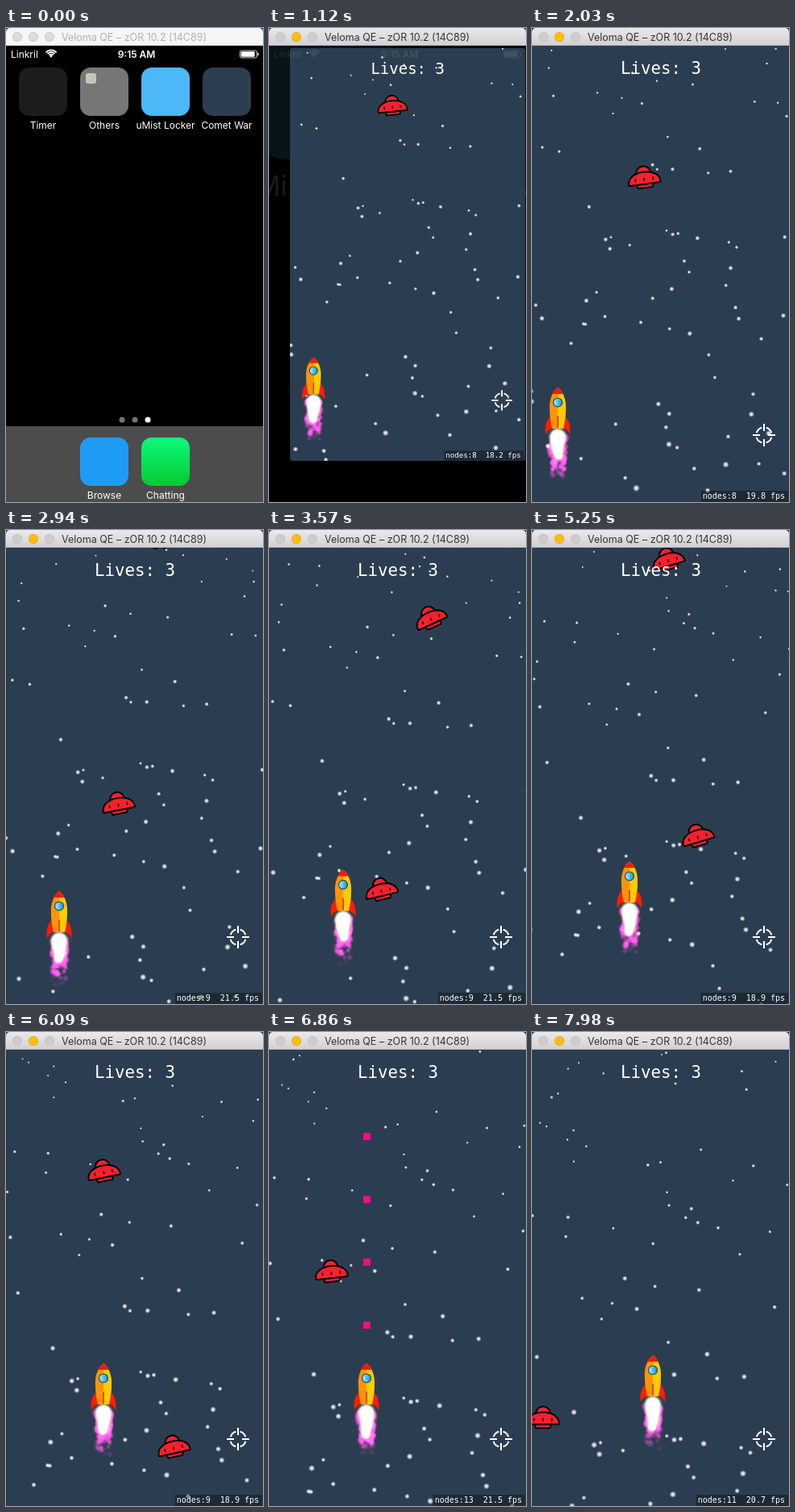
An HTML page with a canvas for the animation above (8000 ms loop, 319x588 px).

```html
<!DOCTYPE html>
<html lang="en">
<head>
<meta charset="utf-8">
<title>Rocket game in a simulator</title>
<style>
  html, body { margin: 0; width: 100%; height: 100%; overflow: hidden; background: #000; }
  canvas { display: block; width: 319px; height: 588px; }
</style>
</head>
<body>
<canvas id="stage" width="319" height="588"></canvas>
<script>
const ctx = document.getElementById('stage').getContext('2d');
const W = 319, H = 588, BAR = 22, LOOP = 8000, STEP = 70;
const SANS = 'Inter, sans-serif';
const MONO = '"DejaVu Sans Mono", monospace';

// Ticks on which the screen stood still, and the tick that stays visible.
const HELD = { 770: 700, 840: 700, 3990: 3920, 7700: 7630 };

const clamp = v => Math.max(0, Math.min(1, v));
const smooth = v => v * v * (3 - 2 * v);

function seeded(seed) {
  return () => {
    seed = (seed * 1664525 + 1013904223) >>> 0;
    return seed / 4294967296;
  };
}

function at(x, y, draw) {
  ctx.save();
  ctx.translate(x, y);
  draw();
  ctx.restore();
}

function disc(x, y, r, fill) {
  ctx.fillStyle = fill;
  ctx.beginPath();
  ctx.arc(x, y, r, 0, 7);
  ctx.fill();
}

function box(x, y, w, h, r, fill) {
  ctx.fillStyle = fill;
  ctx.beginPath();
  ctx.roundRect(x, y, w, h, r);
  ctx.fill();
}

function label(text, x, y, font, fill, align = 'center') {
  ctx.font = font;
  ctx.fillStyle = fill;
  ctx.textAlign = align;
  ctx.fillText(text, x, y);
}

function gradient(x0, y0, x1, y1, ...colors) {
  const g = ctx.createLinearGradient(x0, y0, x1, y1);
  colors.forEach((c, i) => g.addColorStop(i / (colors.length - 1), c));
  return g;
}

function glow(x, y, r, rgb, alpha, core = 0) {
  const g = ctx.createRadialGradient(x, y, 0, x, y, r);
  g.addColorStop(core, `rgba(${rgb},${alpha})`);
  g.addColorStop(1, `rgba(${rgb},0)`);
  disc(x, y, r, g);
}

// ---- Home screen ----
function icon(column, y, name, fill) {
  const x = 16 + 76 * column;
  box(x, y, 60, 60, 13, fill);
  label(name, x + 30, y + 76, `12px ${SANS}`, '#fff');
}

function drawHome() {
  icon(0, 49, 'Timer', '#1c1c1c');
  icon(1, 49, 'Others', '#767676');
  box(99, 56, 13, 13, 3, '#c9c4b8');
  icon(2, 49, 'uMist Locker', '#4cb8f8');
  icon(3, 49, 'Comet War', '#2c3e50');
  for (let i = 0; i < 3; i++) disc(144 + 16 * i, 486, 3.5, i < 2 ? '#747474' : '#fff');
  ctx.fillStyle = '#4c4c4c';
  ctx.fillRect(0, 494, W, 94);
  icon(1, 508, 'Browse', '#1e9cf5');
  icon(2, 508, 'Chatting', gradient(0, 508, 0, 568, '#0bfb7c', '#06c931'));
}

function drawStatus() {
  label('Linkril', 6, 36.5, `12px ${SANS}`, '#fff', 'left');
  label('9:15 AM', 162, 36.5, `600 12px ${SANS}`, '#fff');
  ctx.strokeStyle = '#fff';
  ctx.lineWidth = 1.8;
  for (let r = 3.4; r < 9; r += 2.6) {
    ctx.beginPath();
    ctx.arc(56, 36, r, -Math.PI * .77, -Math.PI * .23);
    ctx.stroke();
  }
  disc(56, 35, 1.4, '#fff');
  ctx.lineWidth = .8;
  ctx.beginPath();
  ctx.roundRect(290.5, 28, 21, 9, 2);
  ctx.stroke();
  box(291.7, 29.2, 17, 6.6, 1, '#fff');
  box(312.3, 31, 1.5, 3, 1, '#fff');
}

function drawTitleBar(active) {
  ctx.fillStyle = '#174a80';
  ctx.fillRect(0, 0, W, 6);
  box(0, 0, W, BAR, [5, 5, 0, 0], active ? gradient(0, 0, 0, BAR, '#ebe9eb', '#d1cfd1') : '#f6f6f6');
  ctx.fillStyle = active ? '#b4b2b4' : '#d8d8d8';
  ctx.fillRect(0, BAR - 1, W, 1);
  for (let i = 0; i < 3; i++) {
    const x = 14 + 20 * i, lit = active && i === 1;
    disc(x, 11, 6, lit ? '#e0a010' : '#bfbdbf');
    disc(x, 11, 5.4, lit ? '#fdbd0b' : active ? '#cecccd' : '#dcdcdc');
  }
  label('Veloma QE – zOR 10.2 (14C89)', 159, 15.5, `12.5px ${SANS}`, active ? '#353535' : '#b2b2b2');
}

// ---- Stars ----
const starRnd = seeded(41);
const stars = Array.from({ length: 150 }, () => ({
  x: starRnd() * 340 - 10, y: starRnd() * 910 - 310, size: .75 + starRnd() * .45
}));

// Stars fall steadily and fan out slightly from a point far above the screen.
function drawStars(clock) {
  for (const s of stars) {
    const y = s.y + .042 * (clock - 700);
    if (y < BAR - 4 || y > H + 4) continue;
    const x = 165 + (s.x - 165) * (y + 1030) / (s.y + 1030);
    glow(x, y, (1.6 + y / H * 2.2) * s.size, '255,255,255', .85, .35);
  }
}

// ---- Saucers: born above the screen, drifting and tilting at constant rates ----
const SAUCERS = [
  { born: 934, x: 139, vx: 0, vy: .169, tilt: -4, spin: -.0035 },
  { born: 2897, x: 198, vx: .003, vy: .161, tilt: -28, spin: .0048 },
  { born: 5028, x: 181, vx: -.0567, vy: .162, tilt: -18, spin: .0062 }
];

const dome = new Path2D('M-9 -4C-9 -17 9 -17 9 -4Z');
const hull = new Path2D('M-20 7.5C-20 -1 -12 -6.5 0 -6.5S20 -1 20 7.5Q20 8.5 18 8.5H-18Q-20 8.5 -20 7.5Z');
const foot = new Path2D('M-10.5 8.5H10.5L9 13H-9Z');

const saucerY = (s, clock) => (clock - s.born) * s.vy;
const saucerAlive = (s, clock) => Math.abs(saucerY(s, clock) - 320) < 350;

function drawSaucer(s, clock) {
  const age = clock - s.born;
  at(s.x + age * s.vx, saucerY(s, clock), () => {
    ctx.rotate((s.tilt + age * s.spin) * Math.PI / 180);
    ctx.fillStyle = '#f5212d';
    ctx.strokeStyle = '#000';
    ctx.lineWidth = 2;
    ctx.lineJoin = 'round';
    for (const part of [foot, dome, hull]) {
      ctx.fill(part);
      ctx.stroke(part);
    }
    for (let x = -11; x <= 11; x += 11) box(x - 1, .5, 2, 4, 1, '#300');
  });
}

// ---- Rocket ----
// Where the player steers the nose: time, x, y.
const STEERING = [
  [2200, 32, 446], [2940, 66, 448], [4270, 121, 392], [4830, 121, 411], [7200, 121, 411], [7980, 150, 401]
];

function nose(clock) {
  const next = STEERING.findIndex(k => k[0] >= clock);
  if (next === 0) return STEERING[0].slice(1);
  const [t0, x0, y0] = STEERING[next - 1], [t1, x1, y1] = STEERING[next];
  const f = (clock - t0) / (t1 - t0);
  return [x0 + (x1 - x0) * f, y0 + (y1 - y0) * f];
}

const fuselage = new Path2D('M0 0C-7 5 -11 16 -10 28C-10 38 -8 46 -7 51H7C8 46 10 38 10 28C11 16 7 5 0 0Z');
const fins = new Path2D('M-9 36C-14 40 -16.5 48 -15 58Q-12 52 -7 51ZM9 36C14 40 16.5 48 15 58Q12 52 7 51Z');

const sparkRnd = seeded(7);
const sparks = Array.from({ length: 60 }, () => ({
  phase: sparkRnd(), side: sparkRnd() * 2 - 1, reach: .8 + sparkRnd() * .3, size: 3 + sparkRnd() * 2.5
}));

function drawFlame(t) {
  ctx.globalCompositeOperation = 'lighter';
  for (const s of sparks) {
    const age = (t / 620 + s.phase) % 1;
    const y = 60 + age * 54 * s.reach;
    glow(s.side * (9 - age), y, s.size * (1.4 - age * .5), '215,25,150', .8 * Math.min(1, (1 - age) * 2.2), .35);
  }
  ctx.globalCompositeOperation = 'source-over';
  const length = 25 + 3 * Math.sin(t / 83);
  const plume = (rgb, grow, alpha, core) => {
    for (let f = 0; f <= 1; f += 1 / 6) {
      glow(Math.sin(t / 61 + f * 6) * f, 61 + f * length, 11.5 - f * 5 + grow, rgb, alpha, core);
    }
  };
  plume('255,215,120', 1.5, .5, .5);
  plume('255,255,255', -.5, 1, .7);
}

function drawShip([x, y], t) {
  at(x, y, () => {
    ctx.fillStyle = '#fb1d05';
    ctx.fill(fins);
    ctx.save();
    ctx.clip(fuselage);
    ctx.fillStyle = '#ff9408';
    ctx.fillRect(-12, 0, 12, 52);
    ctx.fillStyle = '#ffcb05';
    ctx.fillRect(0, 0, 12, 52);
    ctx.fillStyle = '#f41a08';
    ctx.fillRect(-12, 0, 24, 8);
    ctx.restore();
    box(-1, 35, 2, 17, 1, '#e04a08');
    disc(0, 18.5, 6.1, '#34495e');
    disc(0, 18.5, 4.8, gradient(-5, 0, 5, 0, '#b4f3ff', '#45c8f4', '#1797d8'));
    drawFlame(t);
  });
}

// ---- Shots ----
const SHOTS = Array.from({ length: 4 }, (_, i) => 6120 + 205 * i);
const shotAlive = (fired, clock) => clock >= fired && clock < fired + 1750;

function drawShot(fired, clock) {
  box(117, 406.5 - (clock - fired) * .38, 9, 9, 1, '#ff0a86');
}

// ---- Overlays ----
function drawSight() {
  at(288, 505, () => {
    ctx.strokeStyle = '#fff';
    ctx.lineWidth = 2;
    for (let i = 0; i < 4; i++) {
      ctx.beginPath();
      ctx.arc(0, 0, 9.7, .28, Math.PI / 2 - .28);
      ctx.moveTo(5, 0);
      ctx.lineTo(14, 0);
      ctx.stroke();
      ctx.rotate(Math.PI / 2);
    }
  });
}

const FPS = ['18.2', '19.8', '21.5', '22.3', '18.9', '21.5', '20.7'];

function drawStats(t, nodes) {
  const stats = `nodes:${nodes}  ${FPS[Math.floor(t / 1250)]} fps`;
  const left = 314 - stats.length * 6.02;
  ctx.fillStyle = 'rgba(0,0,0,.33)';
  ctx.fillRect(left - 2, 574, 320 - left, 14);
  label(stats, 314, 584, `10px ${MONO}`, '#fff', 'right');
}

function drawGame(t) {
  // The game runs at half speed while it is still loading.
  const clock = Math.max(t, (t + 1940) / 2);
  const saucers = SAUCERS.filter(s => saucerAlive(s, clock));
  const shots = SHOTS.filter(fired => shotAlive(fired, clock));
  ctx.fillStyle = '#2b3e51';
  ctx.fillRect(0, BAR, 320, H - BAR);
  drawStars(clock);
  saucers.forEach(s => drawSaucer(s, clock));
  shots.forEach(fired => drawShot(fired, clock));
  drawShip(nose(clock), clock);
  drawSight();
  label('Lives: 3', 160, 57, `20.8px ${MONO}`, '#fff');
  drawStats(t, 7 + saucers.length + shots.length);
}

// The app grows out of its icon while the home screen zooms and darkens.
function drawLaunch(t, p) {
  ctx.save();
  ctx.transform(1 + 2.07 * p, 0, 0, 1 + 2.07 * p, -556 * p, -165.5 * p);
  drawHome();
  ctx.restore();
  ctx.fillStyle = `rgba(0,0,0,${p})`;
  ctx.fillRect(0, 0, W, H);
  if (p > 0) {
    const x = 244 * (1 - p), y = 49 - 27 * p;
    const w = 60 + 260 * p, h = 60 + 506 * p;
    ctx.save();
    ctx.globalAlpha = clamp(p * 2.5);
    ctx.beginPath();
    ctx.roundRect(x, y, w, h, 13 * (1 - p) + 2);
    ctx.clip();
    ctx.translate(x, y);
    ctx.scale(w / 320, h / (H - BAR));
    ctx.translate(0, -BAR);
    drawGame(t);
    ctx.restore();
  }
  ctx.save();
  ctx.globalAlpha = 1 - p;
  drawStatus();
  ctx.restore();
}

function render(time) {
  const tick = Math.floor(time % LOOP / STEP) * STEP;
  const t = tick < 700 ? 0 : HELD[tick] || tick;
  const p = smooth(clamp((t - 660) / 577));
  ctx.fillStyle = '#000';
  ctx.fillRect(0, 0, W, H);
  if (p < 1) drawLaunch(t, p);
  else drawGame(t);
  drawTitleBar(t >= 700);
}

const start = performance.now();
function loop() {
  render(performance.now() - start);
  requestAnimationFrame(loop);
}
loop();
</script>
</body>
</html>
```
